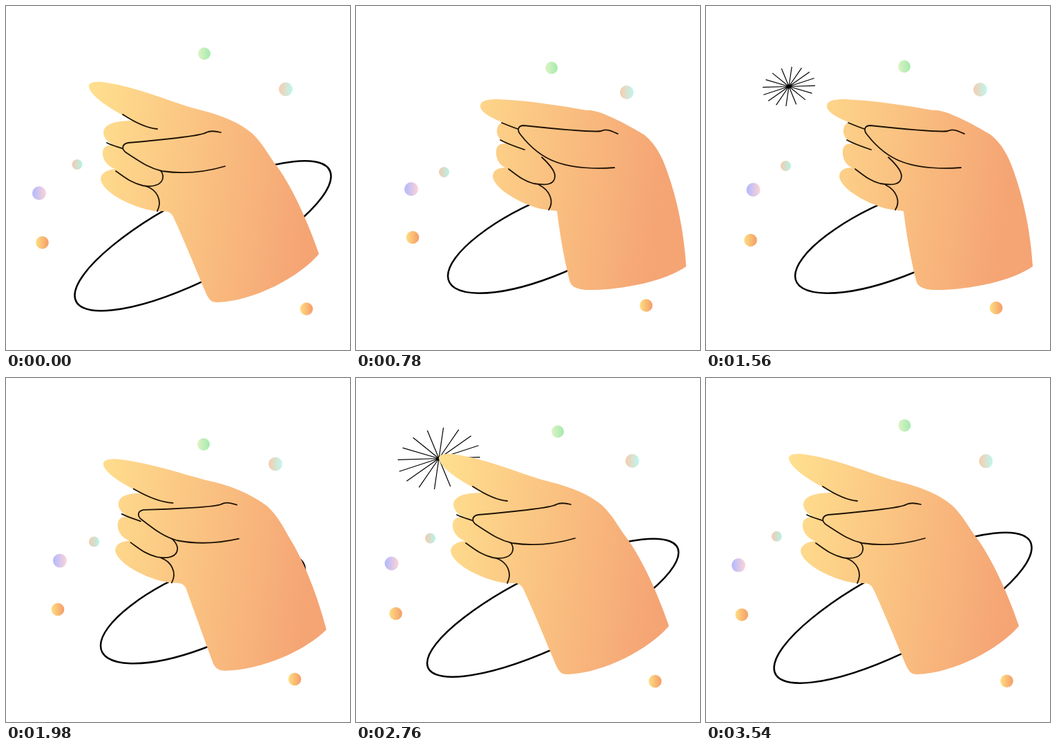
Animation of 498x498 px, one loop 3600 ms. Source, as an HTML page with a canvas:

```html
<!DOCTYPE html>
<html lang="en">
<head>
<meta charset="utf-8">
<title>Tapping hand</title>
<style>
  html, body { margin: 0; width: 100%; height: 100%; overflow: hidden; background: #fff; }
  canvas { display: block; }
</style>
</head>
<body>
<canvas width="498" height="498"></canvas>
<script>
const ctx = document.querySelector('canvas').getContext('2d');
const LOOP = 3600, STEP = 60;

// Shared key times for the dots and the orbit; the last key wraps to the first.
const KEYS = [0, 780, 1140, 1560, 1980, 2760];

const dots = [
  { r: 9, from: '#dff3c4', to: '#a3eaae', x: [287, 283, 288, 287, 286, 292], y: [69, 89.5, 71.5, 87.5, 96, 77.5] },
  { r: 10, from: '#f8cbae', to: '#bdf8f0', x: [405, 392, 402, 397, 390, 400], y: [120.5, 125, 117.5, 121, 124.5, 120] },
  { r: 7.5, from: '#f6c9b0', to: '#b4f4e6', x: [103, 127.5, 109, 115.5, 127.5, 107.5], y: [229.5, 240.5, 231.5, 231.5, 237, 232] },
  { r: 10, from: '#b2b8ff', to: '#fcd4d6', x: [48, 80, 52, 68.5, 78, 51.5], y: [271, 265, 269, 266, 264.5, 268.5] },
  { r: 9.3, from: '#fede82', to: '#f59c68', x: [52.5, 82, 55.5, 64.5, 75, 57.5], y: [342.5, 335, 342, 339, 335, 341] },
  { r: 9.3, from: '#fede82', to: '#f59c68', x: [435, 420, 432, 420, 418, 433], y: [438.5, 433.5, 440.5, 437, 436, 439] }
];

// Half extents of the tilted ellipse and the slant between its axes.
const orbit = {
  w: [185.5, 152, 191, 156, 148, 182],
  h: [108.5, 83, 99.5, 83, 80.5, 100],
  slant: [0.795, 0.7, 0.78, 0.7, 0.68, 0.8]
};

// [time, value] keys: how far the hand is lifted, and its sideways slide.
const liftKeys = [[0, 0], [60, 0], [480, 1], [790, 1], [1150, 0], [1190, 0], [1560, 1], [1680, 1], [2145, 0], [LOOP, 0]];
const slideKeys = [[0, 0], [480, 0], [660, 5], [1050, 5], [1230, 0], [1560, 0], [1680, 5], [2040, 5], [2220, 0], [LOOP, 0]];

// Each shape: [pointing pose, lifted pose], with matching commands.
const outline = [
  `M120 117 C119 111 128 108 146 111 C190 118 232 136 268 147 C305 156 335 166 357 185
   C372 200 380 215 387 225 C413 258 437 312 453 359 C425 392 360 427 306 429
   C298 429 295 426 291 419 C279 391 257 337 243 307 C240 300 236 297 228 297
   L219 297 C192 295 141 273 137 251 C137 243 145 237 158 236
   C145 231 139 221 140 211 C141 204 146 201 156 201
   C147 197 141 190 141 183 C142 172 155 166 184 166 C160 154 123 133 120 117 Z`,
  `M180 146 C179 137 190 135 206 135 C250 137 295 144 334 151 C350 149 390 170 418 187
   C434 200 444 220 450 238 C466 282 475 330 478 377 C448 398 385 412 332 411
   C316 409 311 405 309 397 C301 365 295 330 291 297 C288 296 285 296 283 296
   L277 295 C255 294 201 269 198 247 C198 238 205 234 216 234
   C206 229 202 219 203 209 C204 202 208 199 217 199
   C208 195 203 186 204 180 C205 172 208 169 214 169 C197 163 181 154 180 146 Z`
];
const creases = [
  ['M169 157 C186 168 203 177 219 178', 'M211 169 C230 177 255 187 285 188'],
  ['M146 198 C154 202 162 204 170 207', 'M209 194 C220 200 232 204 244 208'],
  ['M159 239 C172 248 181 256 198 260 C214 263 226 258 227 249 C228 244 225 239 223 238',
   'M221 236 C233 245 242 253 257 257 C275 260 288 259 288 246 C288 238 277 226 269 219'],
  ['M203 261 C218 266 227 281 219 297', 'M265 259 C281 267 287 283 279 295']
];
const thumb = [
  'M311 183 C303 181 296 180 290 183 C284 188 215 195 177 198 C167 200 167 208 175 213 C198 228 208 235 226 239 C260 244 290 240 317 232',
  'M379 185 C370 181 362 177 355 181 C345 183 290 178 243 173 C234 173 233 180 238 186 C252 204 270 219 290 226 C315 235 345 236 374 234'
];

const sparks = [
  { start: 1120, end: 1680, size: 61 },
  { start: 2220, end: 3060, size: 66 }
];

const lerp = (a, b, p) => a + (b - a) * p;
const smooth = p => p * p * (3 - 2 * p);

// Periodic cubic spline through the values at KEYS.
function spline(values, t) {
  const n = KEYS.length;
  const time = i => KEYS[(i + n) % n] + Math.floor(i / n) * LOOP;
  const value = i => values[(i + n) % n];
  const slope = i => (value(i + 1) - value(i - 1)) / (time(i + 1) - time(i - 1));
  const i = KEYS.findLastIndex(k => k <= t);
  const span = time(i + 1) - time(i), p = (t - time(i)) / span, q = 1 - p;
  return lerp(value(i), value(i + 1), smooth(p)) +
    span * p * q * (slope(i) * q - slope(i + 1) * p);
}

// Eased value between the two keys around t.
function eased(keys, t) {
  const i = keys.findLastIndex(k => k[0] <= t);
  const [t0, a] = keys[i], [t1, b] = keys[i + 1];
  return lerp(a, b, smooth((t - t0) / (t1 - t0)));
}

function morph([a, b], p) {
  const target = b.match(/\d+/g);
  let i = 0;
  return new Path2D(a.replace(/\d+/g, n => lerp(+n, +target[i++], p).toFixed(2)));
}

function gradient(x0, y0, x1, y1, from, to) {
  const g = ctx.createLinearGradient(x0, y0, x1, y1);
  g.addColorStop(0, from);
  g.addColorStop(1, to);
  return g;
}

function drawOrbit(t) {
  const w = spline(orbit.w, t), h = spline(orbit.h, t), s = spline(orbit.slant, t);
  ctx.save();
  ctx.transform(w, -h * s, 0, h * Math.sqrt(1 - s * s), 285, 332.7);
  ctx.beginPath();
  ctx.arc(0, 0, 1, 0, 2 * Math.PI);
  ctx.restore();
  ctx.lineWidth = 2.5;
  ctx.strokeStyle = '#000';
  ctx.stroke();
}

function drawDot(dot, t) {
  const x = spline(dot.x, t), y = spline(dot.y, t), r = dot.r;
  ctx.fillStyle = gradient(x - r, y, x + r, y, dot.from, dot.to);
  ctx.beginPath();
  ctx.arc(x, y, r, 0, 2 * Math.PI);
  ctx.fill();
}

// Evenly spaced rays on a flattened, slightly sheared circle.
function drawSpark({ start, end, size }, t) {
  if (t <= start || t >= end) return;
  const r = size * Math.sin(Math.PI * (t - start) / (end - start));
  const x = 120, y = 116.5, rays = 16;
  ctx.beginPath();
  for (let i = 0; i < rays; i++) {
    const angle = 2 * Math.PI * i / rays;
    const c = Math.cos(angle), s = Math.sin(angle);
    ctx.moveTo(x, y);
    ctx.lineTo(x + r * (c - 0.11 * s), y + 0.75 * r * (s - 0.04 * c));
  }
  ctx.lineWidth = 1.2;
  ctx.strokeStyle = ctx.fillStyle = '#000';
  ctx.stroke();
  ctx.beginPath();
  ctx.arc(x, y, 2.5, 0, 2 * Math.PI);
  ctx.fill();
}

function drawHand(t) {
  const lift = eased(liftKeys, t), slide = eased(slideKeys, t);
  const thumbPath = morph(thumb, lift);
  ctx.save();
  ctx.translate(slide - 5 * lift, 0);
  ctx.fillStyle = gradient(110, 180, 450, 225, '#ffe08f', '#f5a474');
  ctx.lineWidth = 1.8;
  ctx.lineCap = 'round';
  ctx.strokeStyle = '#1f1204';
  ctx.fill(morph(outline, lift));
  for (const crease of creases) ctx.stroke(morph(crease, lift));
  ctx.fill(thumbPath);
  ctx.stroke(thumbPath);
  ctx.restore();
}

function draw(now) {
  const t = Math.floor(now % LOOP / STEP) * STEP;
  ctx.fillStyle = '#fff';
  ctx.fillRect(0, 0, 498, 498);
  drawOrbit(t);
  for (const dot of dots) drawDot(dot, t);
  for (const spark of sparks) drawSpark(spark, t);
  drawHand(t);
}

const begin = performance.now();
function tick() {
  draw(performance.now() - begin);
  requestAnimationFrame(tick);
}
tick();
</script>
</body>
</html>
```
